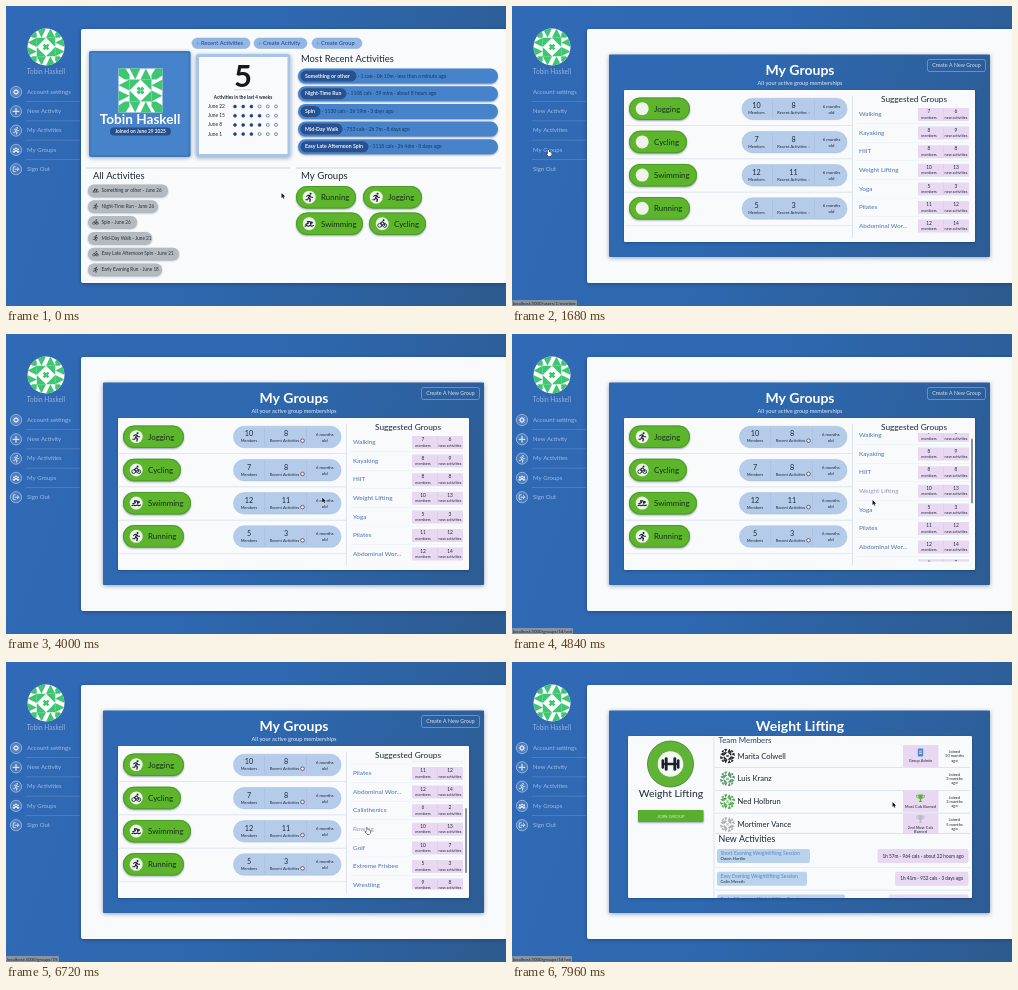
Write an HTML page with a canvas that moves like this. It is 500 by 300 pixels and loops after 8 s.

```html
<!DOCTYPE html>
<html lang="en">
<head>
<meta charset="utf-8">
<title>Activity groups</title>
<style>
html, body { margin: 0; width: 100%; height: 100%; overflow: hidden; background: #2f67b2; }
canvas { display: block; width: 100vw; height: 100vh; }
</style>
</head>
<body>
<canvas id="stage" width="500" height="300"></canvas>
<script>
const ctx = document.getElementById('stage').getContext('2d');
const LOOP = 8000, GROUPS_AT = 1480, ICONS_AT = 1840, DETAIL_AT = 7600;
const USER = 'Tobin Haskell';
const NAVY = '#203f73', INK = '#1c2836', WHITE = '#f8fafc', PINK = '#e8d8f1';

function text(s, x, y, size, color, align = 'left', weight = 400) {
  ctx.font = `${weight} ${size}px Lato, "Open Sans", sans-serif`;
  ctx.textAlign = align;
  ctx.textBaseline = 'middle';
  ctx.fillStyle = color;
  ctx.fillText(s, x, y);
}

function box(x, y, w, h, fill, r = 0, stroke, line = 1) {
  ctx.beginPath();
  ctx.roundRect(x, y, w, h, r);
  if (fill) { ctx.fillStyle = fill; ctx.fill(); }
  if (stroke) { ctx.strokeStyle = stroke; ctx.lineWidth = line; ctx.stroke(); }
}

function raised(blur, draw) {
  ctx.save();
  ctx.shadowColor = 'rgba(10,30,65,.4)';
  ctx.shadowBlur = blur;
  ctx.shadowOffsetY = 1;
  draw();
  ctx.restore();
}

function disc(x, y, r, fill, stroke, line = 1) {
  ctx.beginPath();
  ctx.arc(x, y, r, 0, 7);
  if (fill) { ctx.fillStyle = fill; ctx.fill(); }
  if (stroke) { ctx.strokeStyle = stroke; ctx.lineWidth = line; ctx.stroke(); }
}

function path(points, color, line, close) {
  ctx.beginPath();
  for (let i = 0; i < points.length; i += 2) ctx.lineTo(points[i], points[i + 1]);
  if (close) ctx.closePath();
  if (line) {
    ctx.strokeStyle = color;
    ctx.lineWidth = line;
    ctx.lineCap = ctx.lineJoin = 'round';
    ctx.stroke();
  } else {
    ctx.fillStyle = color;
    ctx.fill();
  }
}

function clipped(x, y, w, h, draw) {
  ctx.save();
  ctx.beginPath();
  ctx.rect(x, y, w, h);
  ctx.clip();
  draw();
  ctx.restore();
}

function at(x, y, scale, draw) {
  ctx.save();
  ctx.translate(x, y);
  ctx.scale(scale, scale);
  draw();
  ctx.restore();
}

// Smooth value through [time, value] stops.
function track(t, stops) {
  let [t0, v0] = stops[0];
  for (const [t1, v1] of stops) {
    if (t < t1) {
      const k = Math.max(0, (t - t0) / (t1 - t0));
      return v0 + (v1 - v0) * k * k * (3 - 2 * k);
    }
    [t0, v0] = [t1, v1];
  }
  return v0;
}

// Icons are drawn inside a box from -5 to 5.
const icons = {
  run(c) {
    disc(1.6, -4, 1.2, c);
    path([-3, -1, -1, -2.4, 1, -1.6, 2, 0, 4, 0], c, 1.2);
    path([.6, -1.6, -.8, 1, 1.4, 2.4, .8, 5], c, 1.5);
    path([-.8, 1, -1.8, 3, -4, 3], c, 1.2);
  },
  bike(c) {
    disc(-3, 2, 2.2, null, c, 1);
    disc(3, 2, 2.2, null, c, 1);
    disc(1.6, -4, 1.1, c);
    path([3, 2, 2, -1, .2, -2.4, -2, -.6, 0, 1, -.3, 3], c, 1.2);
  },
  swim(c) {
    disc(3, -1.2, 1.3, c);
    path([-4, .8, -1, -.6, -2, -2.6, 1, -2.6, 2, 1], c, 1.4);
    path([-5, 3, -3, 2.2, -1, 3, 1, 2.2, 3, 3, 5, 2.2], c, 1.3);
  },
  lift(c) {
    path([-3, 0, 3, 0], c, 1.4);
    for (const s of [-1, 1]) {
      path([s * 2.4, -3, s * 2.4, 3], c, 1.6);
      path([s * 4.3, -2, s * 4.3, 2], c, 1.4);
    }
  },
  gear(c) {
    disc(0, 0, 2.6, null, c, 2);
    for (let i = 0; i < 8; i++) {
      const x = Math.cos(i * Math.PI / 4), y = Math.sin(i * Math.PI / 4);
      path([x * 3.4, y * 3.4, x * 4.2, y * 4.2], c, 1.3);
    }
  },
  plus(c) { path([-4, 0, 4, 0], c, 1.8); path([0, -4, 0, 4], c, 1.8); },
  people(c) {
    for (const [x, y] of [[-3, -1], [3, -1], [0, -2]]) {
      disc(x, y, 1.5, c);
      box(x - 1.9, y + 1.8, 3.8, 3.2, c, 1.5);
    }
  },
  exit(c) {
    path([-1, -3.5, -4, -3.5, -4, 3.5, -1, 3.5], c, 1.3);
    path([-1.5, 0, 4, 0], c, 1.5);
    path([2, -2, 4, 0, 2, 2], c, 1.4);
  },
  cup(c) {
    path([-3, -4, 3, -4, 2, 0, .7, 1.4, .7, 3, 2.4, 4.4, -2.4, 4.4, -.7, 3, -.7, 1.4, -2, 0], c, 0, true);
    path([-3, -3, -4.6, -3, -4, -.6, -2, 0], c, .8);
    path([3, -3, 4.6, -3, 4, -.6, 2, 0], c, .8);
  },
  badge(c) { box(-3, -4.5, 6, 9, c, 1.2); box(-1.5, -2, 3, 1, '#fff'); box(-1.5, .4, 3, 1, '#fff'); }
};
const icon = (name, x, y, size, color) => at(x, y, size / 10, () => icons[name](color));

// Fourfold pattern of tiles inside a box from -5 to 5.
function pattern(x, y, size, color, round) {
  at(x, y, size / 10, () => {
    if (round) { disc(0, 0, 5, '#fff'); ctx.clip(); } else box(-5, -5, 10, 10, '#fff');
    for (let i = 0; i < 4; i++) {
      path([-5, -5, -3.4, -5, -2.5, -3.6, -2.5, -2.5, -3.6, -2.5, -5, -3.4], color, 0, true);
      path([-2.5, -5, 0, -5, -1.2, -2.5], color, 0, true);
      path([0, -2.5, 1.2, -5, 2.5, -2.5], color, 0, true);
      path([-2.5, -2.5, 0, -2.5, -2.5, 0], color, 0, true);
      path([-.9, -.4, -.4, -.9, 0, -.5, 0, 0, -.5, 0], color, 0, true);
      ctx.rotate(Math.PI / 2);
    }
  });
}

function blueFade() {
  const g = ctx.createLinearGradient(0, 60, 500, 240);
  g.addColorStop(0, '#3069b5');
  g.addColorStop(.45, '#2e68b0');
  g.addColorStop(1, '#2c5b91');
  return g;
}

function sidebar(loaded) {
  pattern(40, 41, 37, '#3fc673', true);
  text(USER, 40, 66, 6.6, '#8fb3de', 'center');
  const rows = [['gear', 'Account settings'], ['plus', 'New Activity'], ['run', 'My Activities'],
    ['people', 'My Groups'], ['exit', 'Sign Out']];
  rows.forEach(([name, label], i) => {
    const y = 86 + i * 19.3;
    if (loaded) {
      disc(10, y, 5.6, 'rgba(255,255,255,.12)', '#a5c1e3', .8);
      icon(name, 10, y, 7, '#d3e1f2');
    }
    text(label, 21, y, 6, '#9dbde4');
    if (i < 4) box(20, y + 9.2, 54, .7, 'rgba(190,215,245,.25)');
  });
}

const mainPanel = () => raised(5, () => box(75, 23, 430, 254, WHITE, 2));

function homePage() {
  mainPanel();
  [['Recent Activities', 186, 58], ['Create Activity', 248, 53], ['Create Group', 306, 50]].forEach(([s, x, w]) => {
    box(x, 32, w, 10.5, '#92b6e6', 5.2, '#86abdd', .5);
    text('›', x + 5, 37, 6, NAVY);
    text(s, x + 9, 37.3, 5.7, NAVY);
  });

  raised(4, () => box(83, 45, 101.5, 106, '#4683ca', 2));
  box(84, 46, 99.5, 104, null, 1, '#3d75ba', 1.5);
  pattern(134.5, 84.5, 44, '#3fc673');
  text(USER, 134, 114, 13.6, '#fff', 'center', 700);
  box(104, 121.5, 61, 8, '#264f8c', 4);
  text('Joined on June 29 2025', 134.5, 125.6, 4.8, '#e8f0fa', 'center', 700);

  raised(4, () => box(190, 48, 94.5, 103, WHITE, 2));
  box(191.5, 49.5, 91.5, 100, WHITE, 1, '#a8c5e8', 3);
  text('5', 237, 71.5, 31, '#15181c', 'center', 700);
  box(228, 83.5, 18, .7, '#b9c3cf');
  text('Activities in the last 4 weeks', 237, 91.5, 4.6, INK, 'center', 700);
  [['22', 3], ['15', 4], ['8', 4], ['1', 3]].forEach(([day, count], i) => {
    const y = 100.5 + i * 9.2;
    text('June ' + day, 202, y, 4.9, INK);
    for (let k = 0; k < 6; k++) disc(229 + k * 8.2, y, 1.5, k < count ? '#1d3a78' : null, '#2f4f8c', .6);
  });

  text('Most Recent Activities', 295, 53, 9.4, INK);
  [['Something or other', 56, '1 cals · 0h 10m · less than a minute ago'],
    ['Night-Time Run', 46, '1108 cals · 39 mins · about 8 hours ago'],
    ['Spin', 20, '1130 cals · 2h 19m · 3 days ago'],
    ['Mid-Day Walk', 42, '753 cals · 2h 7m · 8 days ago'],
    ['Easy Late Afternoon Spin', 68, '1118 cals · 2h 46m · 8 days ago']].forEach(([name, w, info], i) => {
    const y = 62.5 + i * 17.7;
    raised(2, () => box(292, y, 200, 15, '#4683ca', 7.5));
    box(294.5, y + 2, w, 11, '#27518f', 5.5);
    text(name, 299, y + 7.6, 5.2, '#eaf1fa', 'left', 700);
    text('· ' + info, 296 + w, y + 7.6, 5, '#163865');
  });

  box(80, 161.5, 204, 1, '#ccd8e6');
  box(290, 161.5, 205, 1, '#ccd8e6');
  text('All Activities', 87, 170.5, 9.4, INK);
  [['swim', 'Something or other - June 26', 80], ['run', 'Night-Time Run - June 26', 70],
    ['bike', 'Spin - June 26', 49], ['run', 'Mid-Day Walk - June 21', 64],
    ['bike', 'Easy Late Afternoon Spin - June 21', 91],
    ['run', 'Early Evening Run - June 18', 74]].forEach(([name, s, w], i) => {
    const y = 178.5 + i * 15.8;
    raised(2, () => box(82, y, w, 12, '#b5babf', 6));
    icon(name, 89.5, y + 6, 5.5, '#1c2a3c');
    text(s, 95.5, y + 6.2, 4.7, '#27313c');
  });

  text('My Groups', 295, 170.5, 9.6, INK);
  [['run', 'Running', 290, 180, 60], ['run', 'Jogging', 357, 180, 59],
    ['swim', 'Swimming', 290, 206.5, 67], ['bike', 'Cycling', 363, 206.5, 57]].forEach(([name, s, x, y, w]) => {
    groupPill(name, s, x, y, w, true);
  });
}

function groupPill(name, label, x, y, w, loaded) {
  raised(2, () => box(x, y, w, 22.5, '#5db52c', 11));
  box(x + .5, y + .5, w - 1, 21.5, null, 10.7, '#48922a', .8);
  disc(x + 13.2, y + 11.2, 6.5, '#eef4ea');
  if (loaded) icon(name, x + 13.2, y + 11.2, 8.5, '#172231');
  text(label, x + 25, y + 11.6, 7.9, '#14301a');
}

function innerPanel(title) {
  mainPanel();
  raised(4, () => box(97, 48.5, 381, 202.5, blueFade(), 1));
  text(title, 288, 65, 14, '#fff', 'center', 700);
}

const suggested = [['Walking', 7, 6], ['Kayaking', 8, 9], ['HIIT', 8, 8], ['Weight Lifting', 10, 13],
  ['Yoga', 5, 3], ['Pilates', 11, 12], ['Abdominal Wor...', 12, 14], ['Calisthenics', 6, 2],
  ['Rowing', 10, 13], ['Golf', 10, 7], ['Extreme Frisbee', 5, 3], ['Wrestling', 9, 8]];
const PITCH = 18.6;

function suggestions(scroll, hovering, scrollbar) {
  text('Suggested Groups', 402, 93, 8.3, INK, 'center');
  clipped(341, 99, 121, 128.5, () => suggested.forEach(([name, members, fresh], i) => {
    const y = 108.3 + i * PITCH - scroll;
    const hot = hovering && Math.abs(y - 166) < PITCH / 2;
    text(name, 347, y, 6.4, hot ? '#9a8fcb' : '#4a73b2');
    box(406, y - 6.3, 51, 13, PINK);
    box(431, y - 6, .6, 12, '#dac8e6');
    [[members, 'members', 417], [fresh, 'new activities', 444]].forEach(([n, s, x]) => {
      text(n, x, y - 2.6, 4.8, INK, 'center');
      text(s, x, y + 3.2, 3.8, INK, 'center');
    });
    box(345, y + 9, 112, .5, '#e6edf5');
  }));
  if (scrollbar) box(459, 101 + scroll * .5, 2, 65, '#8d949d', 1);
}

function groupsPage(t) {
  const loaded = t >= ICONS_AT, shift = loaded ? -1.5 : 0;
  innerPanel('My Groups');
  text('All your active group memberships', 288, 77, 5.6, '#dfeaf7', 'center');
  box(415.5, 53.5, 58, 12, null, 2, '#86a6cd', .7);
  text('Create A New Group', 444.5, 59.3, 5.3, '#d3e0f0', 'center');
  raised(3, () => box(112, 84, 351, 152, WHITE, 1));
  box(340, 90, .8, 142, '#d3dde9');

  [['run', 'Jogging', 61, 10, 8], ['bike', 'Cycling', 58, 7, 8], ['swim', 'Swimming', 68, 12, 11],
    ['run', 'Running', 61, 5, 3]].forEach(([name, s, w, members, recent], i) => {
    const y = 102.7 + i * 33.2;
    groupPill(name, s, 117, y - 11.2, w, loaded);
    const left = loaded ? 227.5 : 230;
    box(left, y - 10.5, 335 - left, 21.5, '#b4cbea', 10.5, '#a2bddf', .5);
    for (const x of [260, 302]) box(x + shift, y - 9.5, .5, 19, '#a3bcdd');
    text(members, 244.5 + shift, y - 2.5, 7.2, INK, 'center');
    text('Members', 244.5 + shift, y + 4.4, 4, INK, 'center');
    text(recent, 281.5 + shift, y - 2.5, 7.2, INK, 'center');
    text('Recent Activities', 280 + shift, y + 4.4, 4, INK, 'center');
    if (loaded) disc(296.5, y + 4, 1.8, '#eef3fa', '#6a4c64', .9);
    else text('›', 296.5, y + 4.4, 4, INK);
    text('6 months', 319.5 + shift / 2, y - 2.5, 4.3, INK, 'center');
    text('old', 319.5 + shift / 2, y + 3.8, 4.3, INK, 'center');
    box(113, y + 16.6, 227, .7, '#d5dee9');
  });

  const scroll = track(t, [[4600, 0], [4840, 7], [5300, 7], [5600, 19], [5850, 19], [6500, 90], [6760, 90], [7360, 0]]);
  suggestions(scroll, (t > 4500 && t < 5200) || t > 6550, t > 4600);
}

function detailPage() {
  innerPanel('Weight Lifting');
  raised(3, () => box(116, 74, 344, 162, WHITE, 1));
  clipped(116, 74, 344, 162, () => {
    disc(158.5, 102, 23, '#5fb335', '#3f7f2a', .8);
    disc(158.5, 102, 12.8, '#f4f8f2');
    icon('lift', 158.5, 102, 18, '#18212c');
    text('Weight Lifting', 159, 131.5, 10.4, INK, 'center');
    raised(2, () => box(126, 148, 65.5, 12, '#58ae2d', 1));
    text('JOIN GROUP', 159, 154.3, 4.6, '#dcebd3', 'center');
    box(201.5, 75, .8, 161, '#d3dde9');

    text('Team Members', 206.5, 78.3, 7.9, '#26406f');
    clipped(202, 83, 258, 88.5, () => {
      [['Marita Colwell', '#1f2830', 'badge', '#4f87c9', ['Group Admin'], 10],
        ['Luis Kranz', '#5c9a6c', '', '', [], 3],
        ['Ned Holbrun', '#55a84f', 'cup', '#5cae3b', ['Most Cals Burned'], 3],
        ['Mortimer Vance', '#a7afb7', 'cup', '#b8bcc3', ['2nd Most Cals', 'Burned'], 5]
      ].forEach(([name, color, mark, tint, notes, age], i) => {
        const y = 94 + i * 22.8;
        pattern(215.5, y, 15, color, true);
        text(name, 225.5, y + .2, 7.6, INK);
        if (mark) {
          const top = notes.length > 1 ? y - 5.5 : y - 3.5;
          box(391, y - 11, 35.5, 22, PINK);
          icon(mark, 408.5, top, 9, tint);
          notes.forEach((s, k) => text(s, 408.5, top + 8.5 + k * 4.2, 4, INK, 'center'));
        }
        ['Joined', age + ' months', 'ago'].forEach((s, k) => text(s, 442.5, y - 4.3 + k * 4.3, 4, INK, 'center'));
        box(203, y + 11.2, 255, .7, '#d5dee9');
      });
    });
    box(203, 171, 255, .8, '#cfd9e5');
    text('New Activities', 206.5, 177.5, 8.9, INK);
    [['Short Evening Weightlifting Session', 'Owen Hartlin', 93, 91, '1h 57m - 964 cals - about 22 hours ago'],
      ['Easy Evening Weightlifting Session', 'Colin Mereth', 90, 73.5, '1h 41m - 932 cals - 3 days ago'],
      ['Early Afternoon Weightlifting Session', 'Owen Hartlin', 128, 80, '1h 20m - 810 cals - 5 days ago']
    ].forEach(([title, who, w, infoW, info], i) => {
      const y = 187 + i * 22.8;
      box(205, y, w, 14, '#b9d3ec', 2);
      text(title, 208.5, y + 4.4, 5.1, '#5c86c0');
      text(who, 208.5, y + 10, 4.2, INK);
      box(456.5 - infoW, y, infoW, 14, PINK, 2);
      text(info, 456.5 - infoW / 2, y + 7.2, 4.7, INK, 'center');
      box(203, y + 18, 255, .6, '#d9e1eb');
    });
  });
}

function statusBar(t) {
  const shown = (t > 1160 && t < 2200) || (t > 4500 && t < 5200) || t > 6550;
  if (!shown) return;
  const [w, route] = t < 2200 ? [65, 'users/1/memberships/all'] : t < 5200 ? [61, 'groups/14/weight']
    : t < 7200 ? [53, 'groups/19/row'] : [60, 'groups/14/weight'];
  box(0, 294, w, 6, '#8793a2', 1);
  clipped(0, 294, w - 1, 6, () => text('localhost:3000/' + route, 1, 297.2, 4.4, '#1d2632'));
}

function cursor(t) {
  const x = track(t, [[160, 275.5], [1160, 36], [2000, 36], [2960, 212.5], [3300, 212.5], [4400, 360.5], [7640, 360.5], [7960, 380.5]]);
  const y = track(t, [[160, 187], [1160, 144], [2000, 144], [2960, 157.5], [3300, 157.5], [4400, 166], [7640, 166], [7960, 140]]);
  const hand = (t > 1160 && t < 2050) || (t > 6550 && t < 7640);
  ctx.save();
  ctx.translate(x, y);
  if (hand) {
    const shape = [0, 0, 1, 0, 1.2, 2, 3.5, 2.4, 3.6, 5, 2.8, 6.2, .4, 6.2, -1.4, 3.6, 0, 3.8];
    path(shape, '#16202c', 1, true);
    path(shape, '#fff', 0, true);
  } else {
    const shape = [0, 0, 0, 5, 1.2, 4, 2, 5.8, 2.8, 5.4, 2, 3.8, 3.6, 3.6];
    path(shape, '#fff', .8, true);
    path(shape, '#10161e', 0, true);
  }
  ctx.restore();
}

function frame() {
  const t = performance.now() % LOOP;
  ctx.fillStyle = blueFade();
  ctx.fillRect(0, 0, 500, 300);
  if (t < GROUPS_AT) homePage();
  else if (t < DETAIL_AT) groupsPage(t);
  else detailPage();
  sidebar(t < GROUPS_AT || t >= ICONS_AT);
  statusBar(t);
  cursor(t);
  requestAnimationFrame(frame);
}
frame();
</script>
</body>
</html>
```
